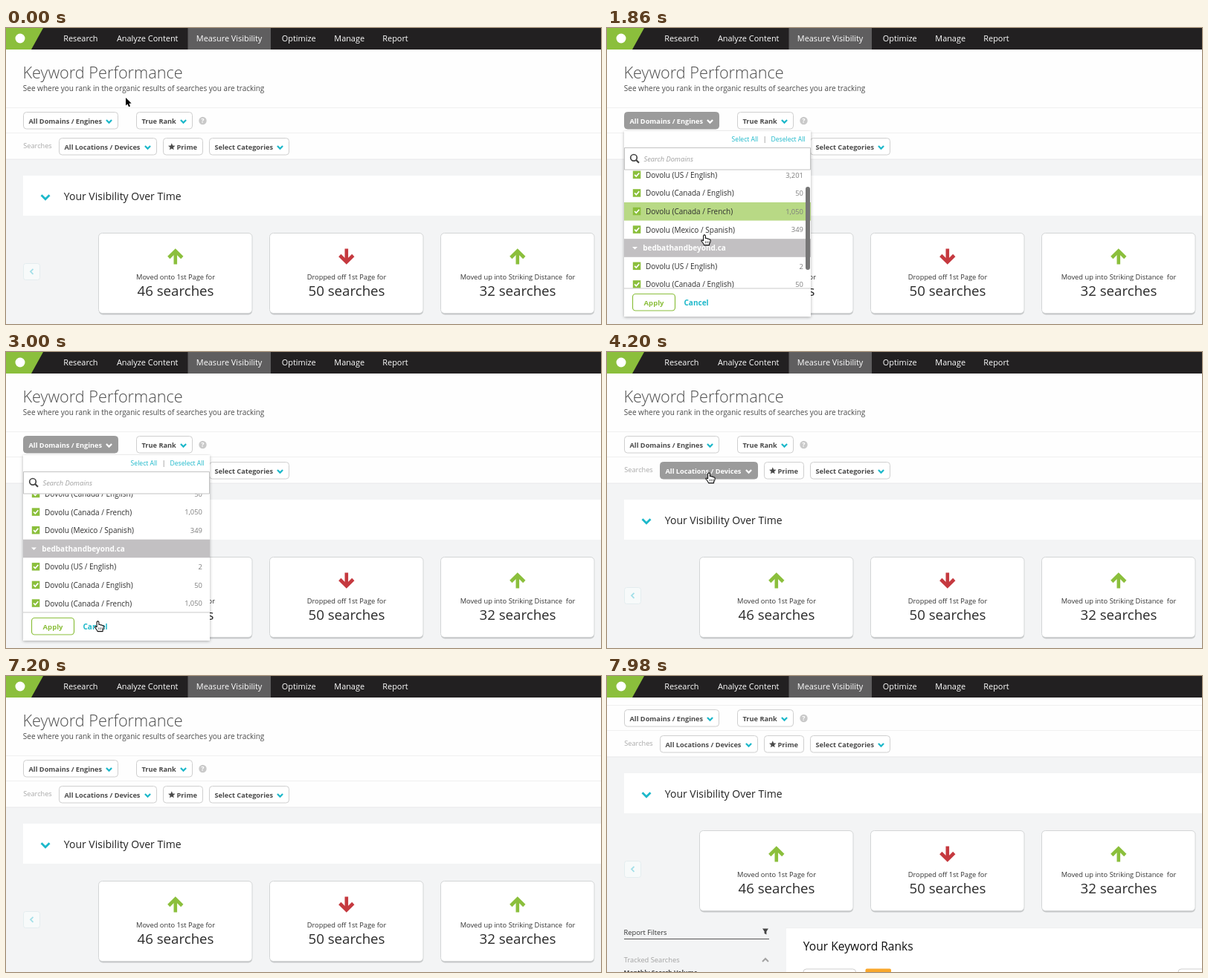
Animation of 800 by 399 pixels, one loop 8 s. Source, as an HTML page with a canvas:

```html
<!DOCTYPE html>
<html lang="en">
<head>
<meta charset="utf-8">
<title>Keyword Performance</title>
<style>
  html, body { margin: 0; width: 100%; height: 100%; overflow: hidden; background: #f3f4f5; }
  canvas { display: block; width: 800px; height: 399px; }
</style>
</head>
<body>
<canvas id="stage"></canvas>
<script>
const W = 800, H = 399, LOOP = 8000, STEP = 60;
const CYAN = '#1cb8ca', GREEN = '#8bbf3c', RED = '#c5393f', INK = '#333', GREY = '#9b9b9b';
const canvas = document.getElementById('stage');
const ctx = canvas.getContext('2d');
const dpr = window.devicePixelRatio || 1;
canvas.width = W * dpr;
canvas.height = H * dpr;

const clamp = (v, a = 0, b = 1) => Math.min(b, Math.max(a, v));
const ramp = (t, a, b) => clamp((t - a) / (b - a));
const smooth = k => k * k * (3 - 2 * k);
const inside = (p, r) => p.x >= r.x && p.x <= r.x + r.w && p.y >= r.y && p.y <= r.y + r.h;

function rect(x, y, w, h, fill) {
  ctx.fillStyle = fill;
  ctx.fillRect(x, y, w, h);
}

function box(x, y, w, h, r, fill, stroke, lw = 1) {
  ctx.beginPath();
  ctx.roundRect(x, y, w, h, r);
  if (fill) { ctx.fillStyle = fill; ctx.fill(); }
  if (stroke) { ctx.strokeStyle = stroke; ctx.lineWidth = lw; ctx.stroke(); }
}

function text(s, x, y, size, color = INK, weight = '400', align = 'left') {
  ctx.font = `${weight} ${size}px "Open Sans", "Noto Sans", sans-serif`;
  ctx.textAlign = align;
  ctx.fillStyle = color;
  ctx.fillText(s, x, y);
}

function poly(points, fill) {
  ctx.beginPath();
  points.forEach(([x, y]) => ctx.lineTo(x, y));
  ctx.closePath();
  if (fill) { ctx.fillStyle = fill; ctx.fill(); }
}

function line(points, color, lw) {
  ctx.beginPath();
  points.forEach(([x, y]) => ctx.lineTo(x, y));
  ctx.strokeStyle = color;
  ctx.lineWidth = lw;
  ctx.stroke();
}

function disc(x, y, r, fill) {
  ctx.beginPath();
  ctx.arc(x, y, r, 0, 7);
  ctx.fillStyle = fill;
  ctx.fill();
}

function chevron(x, y, half, color, lw, dir = 1) {
  const d = half * 0.5 * dir;
  line([[x - half, y - d], [x, y + d], [x + half, y - d]], color, lw);
}

const domainsBtn = { x: 23.5, y: 113.5, w: 127, h: 22.5, label: 'All Domains / Engines' };
const rankBtn = { x: 175.5, y: 113.5, w: 75, h: 22.5, label: 'True Rank' };
const locationsBtn = { x: 71.5, y: 148.5, w: 131, h: 22.5, label: 'All Locations / Devices' };
const categoriesBtn = { x: 273.5, y: 148.5, w: 107, h: 22.5, label: 'Select Categories' };

function button(b, active) {
  box(b.x, b.y, b.w, b.h, 4, active ? GREY : '#fff', active ? GREY : '#cfcfcf');
  text(b.label, b.x + 7, b.y + 15.1, 9.2, active ? '#fff' : '#4a4a4a', '700');
  chevron(b.x + b.w - 12, b.y + 12.3, 3.6, active ? '#fff' : CYAN, 2.2);
}

function star(cx, cy, r) {
  const pts = [];
  for (let i = 0; i < 10; i++) {
    const a = i * Math.PI / 5 - Math.PI / 2, q = i % 2 ? r * 0.45 : r;
    pts.push([cx + q * Math.cos(a), cy + q * Math.sin(a)]);
  }
  poly(pts, '#4a4a4a');
}

function bigArrow(x, y, dir, color) {
  ctx.save();
  ctx.translate(x, y);
  ctx.scale(1, dir);
  line([[-9, 1.5], [0, -7.5], [9, 1.5]], color, 4.6);
  line([[0, -6], [0, 10.5]], color, 4.6);
  ctx.restore();
}

function card(x, dir, label, count) {
  box(x, 277.5, 206, 109, 5, '#c6c8c9');
  box(x - 0.5, 276.5, 206.5, 108, 5, '#fff', '#d3d5d6');
  bigArrow(x + 102.8, 308, dir, dir > 0 ? GREEN : RED);
  text(label, x + 103, 339.2, 9.3, INK, '400', 'center');
  text(count + ' searches', x + 103, 361, 18.7, '#2b2b2b', '400', 'center');
}

function header() {
  rect(0, 0, W, 29, '#222021');
  rect(244.5, 0, 111.5, 29, '#5f5e5f');
  poly([[0, 0], [50, 0], [34, 29], [0, 29]], GREEN);
  disc(19, 14, 6.5, '#fff');
  const items = [['Research', 77.2], ['Analyze Content', 148.9], ['Measure Visibility', 255.8],
    ['Optimize', 370.8], ['Manage', 441.3], ['Report', 506.3]];
  items.forEach(([s, x]) => text(s, x, 17.8, 10.9, '#fff'));
}

function page(scroll, active1, active2) {
  ctx.save();
  ctx.translate(0, -scroll);
  rect(0, 0, W, 600, '#f3f4f5');
  rect(0, 0, W, 177, '#fefefe');
  rect(0, 107, W, 1, '#f0f0f0');
  rect(0, 141, W, 1, '#f0f0f0');
  rect(0, 176.5, W, 1, '#e9eaeb');

  text('Keyword Performance', 22.4, 68.2, 21.7, '#4c4c4c', '300');
  text('See where you rank in the organic results of searches you are tracking', 22.8, 85.2, 10, '#4c4c4c');
  button(domainsBtn, active1);
  button(rankBtn);
  disc(264.5, 125, 5.2, '#c9c9c9');
  text('?', 264.5, 128.3, 9, '#fff', '700', 'center');
  text('Searches', 23.3, 162.2, 9.2, '#a9a9a9');
  button(locationsBtn, active2);
  box(211.5, 148.5, 53, 22.5, 4, '#fff', '#cfcfcf');
  star(222.8, 160.3, 5);
  text('Prime', 229.5, 163.6, 9.3, '#4a4a4a', '700');
  button(categoriesBtn);

  rect(23, 199, 777, 54, '#fff');
  chevron(53, 228, 5.5, CYAN, 2.8);
  text('Your Visibility Over Time', 77.8, 231.8, 14, '#222');
  box(23.5, 317.5, 22, 22, 3, '#f7fafa', '#e4edef');
  line([[36.5, 324.8], [33, 328.3], [36.5, 331.8]], '#a3dfe8', 1.8);
  card(125, 1, 'Moved onto 1st Page for', 46);
  card(355, -1, 'Dropped off 1st Page for', 50);
  card(585, 1, 'Moved up into Striking Distance  for', 32);

  text('Report Filters', 22.5, 416.8, 9.3);
  poly([[209, 408.5], [217, 408.5], [214.4, 412.3], [214.4, 416.5], [211.6, 415], [211.6, 412.3]], '#444');
  rect(23, 422, 195, 1, '#555');
  text('Tracked Searches', 22.8, 454.2, 9.3, '#a2a2a2');
  chevron(213, 451, 4, '#a2a2a2', 2, -1);
  text('Monthly Search Volume', 22.5, 471, 8.4, '#444', '700');
  rect(241, 407.5, 559, 193, '#fff');
  rect(240.5, 407.5, 559.5, 0.6, '#e6e7e8');
  text('Your Keyword Ranks', 263.8, 438, 15.6, '#111');
  box(264, 463, 70.5, 22, 4, '#fff', '#cfcfcf');
  box(347.5, 462.5, 34.5, 22, 2, '#f9a72b');
  box(768, 463, 60, 22, 4, '#fff', '#cfcfcf');
  ctx.restore();
}

const ROW = 24.6, LIST_TOP = 191.2, LIST_END = 351;
const engine = s => `Dovolu (${s})`;
const domains = {
  dx: 0, dy: 0, hint: 'Search Domains',
  rows: [['bedbathandbeyond.com'], [engine('US / English'), '3,201'], [engine('Canada / English'), '50'],
    [engine('Canada / French'), '1,050'], [engine('Mexico / Spanish'), '349'], ['bedbathandbeyond.ca'],
    [engine('US / English'), '2'], [engine('Canada / English'), '50'], [engine('Canada / French'), '1,050']]
};
const locations = {
  dx: 47.5, dy: 35, hint: 'Search Locations',
  rows: [['United States'], ['Desktop', '3,201'], ['Smartphone', '50'], ['Tablet', '349'],
    ['Canada'], ['Desktop', '1,050'], ['Smartphone', '50']]
};

function listRow([label, count], y, hot) {
  const mid = y + ROW / 2;
  if (!count) {
    rect(23, y, 251, ROW, '#c2c0c2');
    poly([[34, mid - 1.5], [41, mid - 1.5], [37.5, mid + 2]], '#fff');
    text(label, 48.2, mid + 3.6, 10, '#fff', '700');
    return;
  }
  if (hot) rect(23, y, 251, ROW, '#b8d985');
  rect(34.8, mid - 5.5, 10.5, 10.5, GREEN);
  line([[37.1, mid - 0.3], [39.3, mid + 2], [43.3, mid - 2.6]], '#fff', 1.7);
  text(label, 52, mid + 3.8, 10, '#2f2f2f');
  text(count, 263.9, mid + 3.5, 9.4, '#7d7d7d', '400', 'right');
}

function panel(p, shown, scroll = 0, hot = -1, bar = 0) {
  if (shown <= 0) return;
  ctx.save();
  ctx.translate(p.dx, p.dy);
  ctx.beginPath();
  ctx.rect(18, 137.5, 262, 257 * shown);
  ctx.clip();
  ctx.save();
  ctx.shadowColor = 'rgba(0,0,0,.3)';
  ctx.shadowBlur = 4 * dpr;
  ctx.shadowOffsetY = dpr;
  rect(23, 139, 251, 250, '#fff');
  ctx.restore();

  text('Select All', 167.6, 152.8, 8.6, CYAN);
  text('|', 212, 152.5, 8.6, '#777', '400', 'center');
  text('Deselect All', 220.5, 152.8, 8.6, CYAN);

  ctx.save();
  ctx.beginPath();
  ctx.rect(23, LIST_TOP, 251, LIST_END - LIST_TOP);
  ctx.clip();
  p.rows.forEach((r, i) => listRow(r, LIST_TOP + i * ROW - scroll, i === hot));
  if (bar > 0) {
    ctx.globalAlpha = bar;
    box(267, 193 + scroll * 0.7, 6, 112, 3, '#767676');
    ctx.globalAlpha = 1;
  }
  ctx.restore();

  box(23.5, 161.5, 250, 29.5, 0, '#fff', '#c3c3c3');
  ctx.beginPath();
  ctx.arc(36, 174.8, 4.3, 0, 7);
  ctx.strokeStyle = '#444';
  ctx.lineWidth = 1.7;
  ctx.stroke();
  line([[39.2, 178], [43, 181.8]], '#444', 2.2);
  text(p.hint, 49.5, 179.8, 9.3, '#a0a0a0', 'italic 400');

  rect(23, 350.5, 251, 1, '#c9c9c9');
  box(34.5, 358.5, 57, 22.5, 4, '#fff', GREEN, 1.2);
  text('Apply', 63, 373.7, 9.5, GREEN, '700', 'center');
  text('Cancel', 103.5, 374, 10, CYAN, '700');
  ctx.restore();
}

function pointer(p, hand) {
  ctx.save();
  ctx.translate(p.x, p.y);
  ctx.lineJoin = 'round';
  if (hand) {
    ctx.beginPath();
    ctx.moveTo(-1.4, 8);
    ctx.lineTo(-1.4, 1);
    ctx.quadraticCurveTo(0, -1.2, 1.4, 1);
    ctx.lineTo(1.4, 4.6);
    ctx.quadraticCurveTo(3, 3.6, 4, 5.2);
    ctx.quadraticCurveTo(5.4, 4.4, 6.2, 5.9);
    ctx.quadraticCurveTo(8, 5.4, 8.2, 7.2);
    ctx.quadraticCurveTo(8.3, 10.5, 6.6, 12);
    ctx.lineTo(6.6, 13.6);
    ctx.lineTo(-0.4, 13.6);
    ctx.quadraticCurveTo(-1, 11.6, -4.2, 8);
    ctx.quadraticCurveTo(-4, 6, -1.4, 8);
    ctx.fillStyle = '#fff';
    ctx.fill();
    ctx.strokeStyle = '#111';
    ctx.lineWidth = 1.1;
    ctx.stroke();
    [1.4, 3.7, 6].forEach(x => line([[x, 8.4], [x, 11.4]], '#111', 0.7));
  } else {
    poly([[0, 0], [0, 10.6], [2.4, 8.4], [4.1, 12.2], [6, 11.4], [4.4, 7.7], [7.6, 7.4]]);
    ctx.strokeStyle = '#fff';
    ctx.lineWidth = 1.8;
    ctx.stroke();
    ctx.fillStyle = '#000';
    ctx.fill();
  }
  ctx.restore();
}

// Pointer stops: time, x, y
const path = [[0, 161, 94], [150, 161, 94], [420, 109, 135], [1230, 109, 135], [1740, 131, 279],
  [2340, 131, 279], [2880, 123.5, 363], [3720, 123.5, 363], [4200, 137, 163], [5640, 137, 163], [5760, 592, 130]];

function pointerAt(t) {
  let i = 0;
  while (i < path.length - 2 && t >= path[i + 1][0]) i++;
  const [t0, x0, y0] = path[i], [t1, x1, y1] = path[i + 1];
  const k = smooth(ramp(t, t0, t1));
  return { x: x0 + (x1 - x0) * k, y: y0 + (y1 - y0) * k };
}

const openness = (t, open, close) => ramp(t, open - 60, open + 120) - ramp(t, close - 60, close + 120);

function draw(t) {
  const p = pointerAt(t);
  const open1 = openness(t, 720, 3300), open2 = openness(t, 4440, 5100);
  const over1 = inside(p, domainsBtn);
  const over2 = open1 <= 0 && inside(p, locationsBtn);
  const pageScroll = t < 7560 ? 0 : Math.round(68 * ((t - 7500) / 480) ** 1.86);

  const k = ramp(t, 1740, 2340);
  const listScroll = 61.5 * (1 - (1 - k) ** 3);
  const bar = ramp(t, 1740, 1800) * (1 - ramp(t, 2500, 2740));
  // Hover keeps its row while the list is scrolling.
  const hoverScroll = k < 1 ? 0 : listScroll;
  const inList = p.y > LIST_TOP && p.y < LIST_END;
  const hot = inList ? Math.floor((p.y + hoverScroll - LIST_TOP) / ROW) : -1;

  ctx.setTransform(dpr, 0, 0, dpr, 0, 0);
  page(pageScroll, over1 || open1 > 0, over2 || open2 > 0);
  panel(domains, open1, listScroll, hot, bar);
  panel(locations, open2);
  header();
  if (t < 5820) pointer(p, over1 || over2 || open1 > 0);
}

function tick(now) {
  draw(Math.floor((now % LOOP) / STEP) * STEP);
  requestAnimationFrame(tick);
}
requestAnimationFrame(tick);
</script>
</body>
</html>
```
